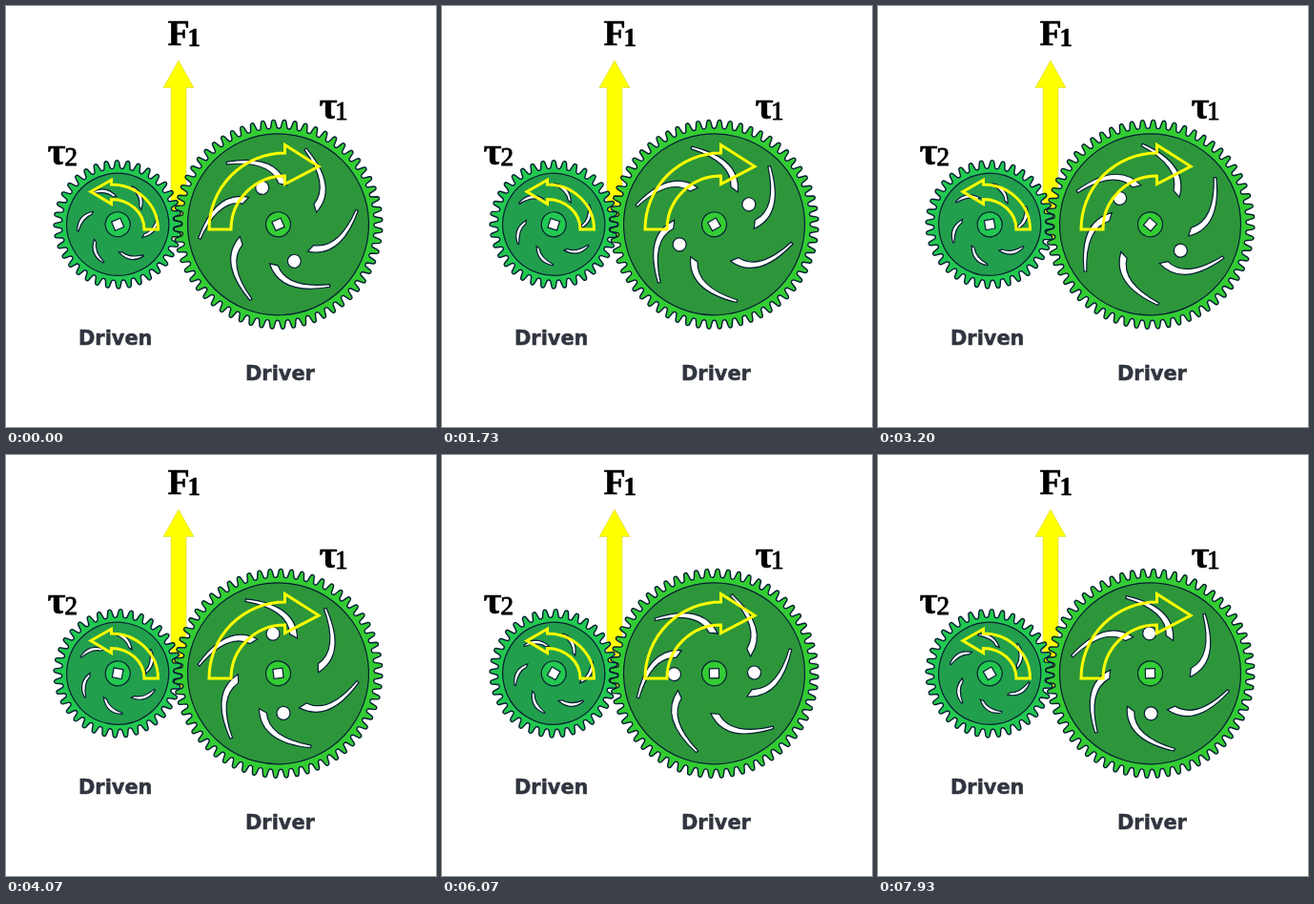
Write an HTML page with a canvas that moves like this. It is 451 by 441 pixels and loops after 8000 ms.

```html
<!DOCTYPE html>
<html lang="en">
<head>
<meta charset="utf-8">
<title>Gear torque</title>
<style>
html, body { margin: 0; width: 100%; height: 100%; overflow: hidden; background: #fff; }
canvas { display: block; }
</style>
</head>
<body>
<canvas id="stage" width="451" height="441"></canvas>
<script>
const ctx = document.getElementById('stage').getContext('2d');
const LOOP = 8000, STEPS = 120;
const RAD = Math.PI / 180;
const TURN = 360 / 112;          // driver degrees per step
const START = -23.6;
const INK = '#061c34', YELLOW = '#ffff00';

const driver = {
  x: 285.5, y: 228.8, teeth: 60, tip: 109.5, root: 100.5, disc: 95, hub: 13,
  rim: '#33cc33', face: '#2d963a', holes: true,
  slot: {
    a: [17, 38.4], outer: [45.8, 59.2], tip: [82.5, 20.5],
    end: [80.8, 18.5], inner: [47.2, 49], b: [25.3, 34.8]
  }
};
const driven = {
  x: 117.2, y: 228.8, teeth: 36, tip: 67.2, root: 58.5, disc: 53.5, hub: 13,
  rim: '#22c850', face: '#229f4c', holes: false,
  slot: {
    a: [18.6, 22.4], outer: [35.6, 25.8], tip: [41.8, 10],
    end: [40.8, 9.2], inner: [31, 20.8], b: [21.5, 20]
  }
};

function paint(fill, stroke = INK, width = 1.2) {
  if (fill) { ctx.fillStyle = fill; ctx.fill(); }
  if (stroke) { ctx.strokeStyle = stroke; ctx.lineWidth = width; ctx.stroke(); }
}

function disc(x, y, r, fill) {
  ctx.beginPath();
  ctx.arc(x, y, r, 0, 2 * Math.PI);
  paint(fill);
}

function polygon(points) {
  ctx.beginPath();
  points.forEach(p => ctx.lineTo(...p));
  ctx.closePath();
}

function toothPath(g) {
  const pitch = 2 * Math.PI / g.teeth;
  const at = (f, r) => [r * Math.cos(f * pitch), r * Math.sin(f * pitch)];
  ctx.beginPath();
  for (let i = 0; i < g.teeth; i++) {
    ctx.lineTo(...at(i - 0.32, g.root + 1));
    ctx.lineTo(...at(i - 0.17, g.tip - 1.5));
    ctx.quadraticCurveTo(...at(i - 0.13, g.tip), ...at(i, g.tip));
    ctx.quadraticCurveTo(...at(i + 0.13, g.tip), ...at(i + 0.17, g.tip - 1.5));
    ctx.lineTo(...at(i + 0.32, g.root + 1));
    ctx.quadraticCurveTo(...at(i + 0.5, g.root - 1), ...at(i + 0.68, g.root + 1));
  }
  ctx.closePath();
}

function drawSlot(s) {
  ctx.beginPath();
  ctx.moveTo(...s.a);
  ctx.quadraticCurveTo(...s.outer, ...s.tip);
  ctx.lineTo(...s.end);
  ctx.quadraticCurveTo(...s.inner, ...s.b);
  ctx.closePath();
  paint('#fff');
}

function drawGear(g, angle, toothAngle) {
  ctx.save();
  ctx.translate(g.x, g.y);
  ctx.save();
  ctx.rotate(toothAngle * RAD);
  toothPath(g);
  paint(g.rim, INK, 1.4);
  ctx.restore();
  ctx.rotate(angle * RAD);
  disc(0, 0, g.disc, g.face);
  for (let i = 0; i < 6; i++) {
    drawSlot(g.slot);
    ctx.rotate(60 * RAD);
  }
  if (g.holes) {
    disc(0, 42, 7, '#fff');
    disc(0, -42, 7, '#fff');
  }
  disc(0, 0, g.hub, g.rim);
  ctx.beginPath();
  ctx.rect(-5, -5, 10, 10);
  paint('#fff');
  ctx.restore();
}

function drawForce() {
  polygon([[181, 57], [197, 85.5], [189, 85.5], [189, 243], [173, 243], [173, 85.5], [165, 85.5]]);
  paint(YELLOW, '#dcdc50', 0.7);
}

// A hollow quarter-turn arrow; dir is the direction of its head.
function drawTurn(cx, cy, dir, outer, inner, tip, half) {
  const [ox, oy] = outer, [ix, iy] = inner;
  const mid = cy - (oy + iy) / 2;
  const from = dir > 0 ? Math.PI : 0;
  const turn = dir > 0 ? Math.PI * 1.5 : -Math.PI / 2;
  ctx.beginPath();
  ctx.ellipse(cx, cy, ox, oy, 0, from, turn, dir < 0);
  ctx.lineTo(cx, mid - half);
  ctx.lineTo(...tip);
  ctx.lineTo(cx, mid + half);
  ctx.ellipse(cx, cy, ix, iy, 0, turn, from, dir > 0);
  ctx.closePath();
  paint(null, YELLOW, 3);
}

function label(text, x, y, font, color = '#000', weight = 0.5) {
  ctx.font = font;
  ctx.fillStyle = ctx.strokeStyle = color;
  ctx.lineWidth = weight;
  ctx.fillText(text, x, y);
  ctx.strokeText(text, x, y);
}

function drawLabels() {
  const serif = '"Liberation Serif", serif';
  const sans = 'bold 20.9px "DejaVu Sans", sans-serif';
  label('F', 169.5, 41, `bold 38px ${serif}`);
  label('1', 190.5, 41.5, `bold 27px ${serif}`);
  label('τ', 328.5, 118, `bold 41px ${serif}`);
  label('1', 345, 118.5, `27px ${serif}`, '#000', 0.9);
  label('τ', 43.5, 166, `bold 41px ${serif}`);
  label('2', 61.5, 166.5, `27px ${serif}`, '#000', 0.9);
  label('Driven', 76, 355, sans, '#30353f');
  label('Driver', 251, 392, sans, '#30353f');
}

// Steps begin on times rounded to 10 ms.
function stepAt(t) {
  const n = Math.floor(t * STEPS / LOOP) + 1;
  const begin = k => Math.round(k * LOOP / STEPS / 10) * 10;
  if (begin(n) <= t) return n % STEPS;
  return begin(n - 1) <= t ? n - 1 : n - 2;
}

function draw(step) {
  const turn = step * TURN;
  const ratio = driver.teeth / driven.teeth;
  const angle = START + turn;
  const toothAngle = angle + 180 / driver.teeth;
  ctx.fillStyle = '#fff';
  ctx.fillRect(0, 0, 451, 441);
  drawForce();
  // The driven teeth sit half a pitch off so that they mesh.
  drawGear(driven, -22.6 - turn * ratio, 180 / driven.teeth - toothAngle * ratio);
  drawGear(driver, angle, toothAngle);
  drawTurn(292.5, 234, 1, [79.5, 80], [56.5, 56], [328, 168], 20.5);
  drawTurn(110.5, 234, -1, [49, 47], [34.5, 31.5], [89, 194.5], 12.5);
  drawLabels();
}

const origin = performance.now();
function tick() {
  draw(stepAt((performance.now() - origin) % LOOP));
  requestAnimationFrame(tick);
}
tick();
</script>
</body>
</html>
```
